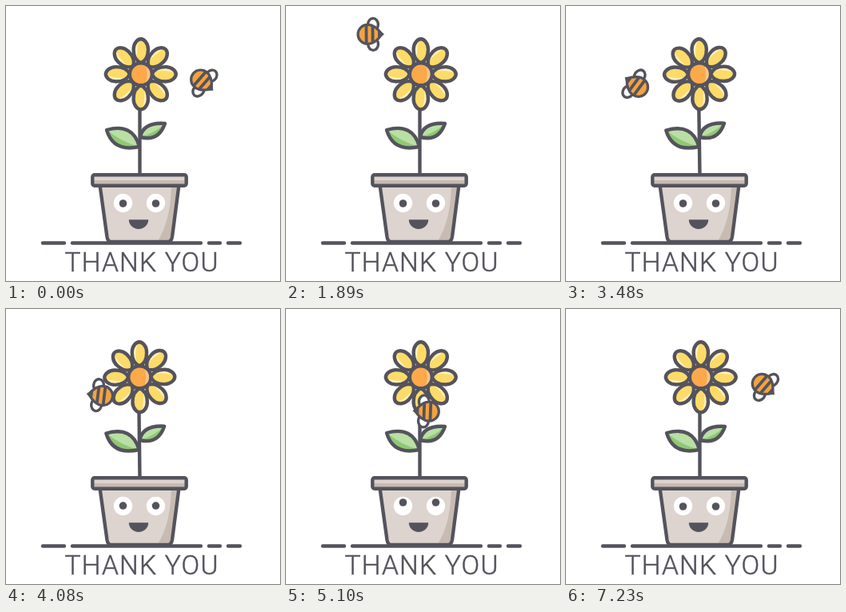
These frames come from a looping animation (343 by 344 pixels, 7.26 s). An HTML page:

```html
<!DOCTYPE html>
<html lang="en">
<head>
<meta charset="utf-8">
<title>Thank you</title>
<style>
  html, body { margin: 0; width: 100%; height: 100%; overflow: hidden; background: #fff; }
  svg { display: block; width: 100vw; height: 100vh; }
  .line { stroke: #54535d; stroke-width: 4.4; stroke-linecap: round; stroke-linejoin: round; fill: none; }
  .dark { fill: #54535d; }
  .light { fill: #b9dfa5; }
  .shade { fill: #8fc874; }
  text { font: 300 33.5px Roboto, sans-serif; letter-spacing: 1.2px; fill: #54535d; stroke: #54535d; stroke-width: .5; text-anchor: middle; }
</style>
</head>
<body>
<svg viewBox="0 0 343 344">
  <defs>
    <path id="petalShape" d="M0-14C-7-17-9.2-25-9.2-31C-9.2-39-4-44 0-44S9.2-39 9.2-31C9.2-25 7-17 0-14Z"/>
    <g id="petal">
      <use href="#petalShape" fill="#fddb68"/>
      <path d="M-2-42Q-12-31-4-18Q-6-30-2-42" fill="#fef0bd"/>
      <use href="#petalShape" class="line"/>
    </g>
    <path id="leftLeaf" d="M126 155Q159 146 167 176Q134 183 126 155Z"/>
    <path id="rightLeaf" d="M168 164Q172 145 199 147Q191 170 168 164Z"/>
    <path id="pot" d="M117.5 224L126.5 289Q127.5 295 132 295H202Q207 295 208 289L216.5 224"/>
    <clipPath id="potShape"><use href="#pot"/></clipPath>
  </defs>

  <g id="plant">
    <path class="line" d="M167.5 128V212"/>
    <use href="#leftLeaf" class="light"/>
    <path class="shade" d="M126 155Q146 171 167 176Q134 183 126 155Z"/>
    <use href="#leftLeaf" class="line"/>
    <use href="#rightLeaf" class="light"/>
    <path class="shade" d="M168 164Q186 159 199 147Q191 170 168 164Z"/>
    <use href="#rightLeaf" class="line"/>
    <g id="flower" transform="translate(168.8 85.3)"></g>
  </g>

  <g clip-path="url(#potShape)">
    <path d="M110 220H225V300H110Z" fill="#ddd3cf"/>
    <path d="M207 220Q207 270 188 297H225V220Z" fill="#c8bbb2"/>
  </g>
  <use href="#pot" class="line"/>
  <path d="M109 211H225V218H109Z" fill="#ddd3cf"/>
  <path d="M109 218H225V225H109Z" fill="#c8bbb2"/>
  <rect class="line" x="108.3" y="211.3" width="117.4" height="13.4" rx="2.5"/>
  <path class="line" d="M46 296.5H73M83 296.5H244M254 296.5H268M278 296.5H293"/>

  <g id="eyes"></g>
  <path class="dark" d="M153.8 267.3H178.2A12.2 11.7 0 0 1 153.8 267.3Z"/>
  <text x="170.1" y="332.3">THANK YOU</text>

  <g id="bee">
    <g class="line" style="fill:#fff;stroke-width:3.4">
      <ellipse cx="-4" cy="-12.2" rx="6.4" ry="7.8"/>
      <ellipse cx="-4" cy="12.2" rx="6.4" ry="7.8"/>
    </g>
    <path class="line" style="fill:#f2a340;stroke-width:3.2" d="M-15 0Q-6-12.5 3-12A12 12 0 0 1 3 12Q-6 12.5-15 0Z"/>
    <path class="line" style="stroke-width:3.8;stroke-linecap:butt" d="M-3.5-11V11M4.5-12V12"/>
    <path class="dark" d="M-18 0L-10-6.5V6.5Z"/>
  </g>
</svg>
<script>
const $ = id => document.getElementById(id);
const LOOP = 7260;

// Points on the bee's closed path, evenly spaced in time
const path = [
  [246, 94], [204, 67], [158, 47], [110, 35.5], [78, 44], [72.5, 80],
  [95, 104], [127, 110], [160, 126], [199, 130], [238.5, 144], [267, 122]
];

// Catmull-Rom position along the path
function fly(t) {
  const n = path.length, s = (t / LOOP + 1) * n, i = Math.floor(s), u = s - i;
  const [p, a, b, q] = [-1, 0, 1, 2].map(d => path[(i + d) % n]);
  return [0, 1].map(k => a[k] + u / 2 * (b[k] - p[k] +
    u * (2 * p[k] - 5 * a[k] + 4 * b[k] - q[k] + u * (3 * (a[k] - b[k]) + q[k] - p[k]))));
}

const clamp = v => Math.min(1, Math.max(0, v));
const smooth = v => (1 - Math.cos(Math.PI * clamp(v))) / 2;
// Rises from 0 to 1 after start and falls back before end
const pulse = (t, start, end, ramp) => smooth(Math.min(t - start, end - t) / ramp);

$('flower').innerHTML = [45, 135, 225, 315, 0, 90, 180, 270]
  .map(a => `<use href="#petal" transform="rotate(${a})"/>`).join('') +
  '<circle r="14" fill="#fca94a"/><path d="M5-13A14 14 0 0 1 5 13Q11 0 5-13" fill="#fbc486"/>' +
  '<circle class="line" r="14"/>';
$('eyes').innerHTML = [146.5, 187.5].map(x =>
  `<g class="eye" data-x="${x}"><circle r="11.7" fill="#fff"/><circle class="pupil dark" r="4.8"/></g>`).join('');
const eyes = document.querySelectorAll('.eye'), pupils = document.querySelectorAll('.pupil');

function draw(now) {
  const t = now % LOOP;
  const [x, y] = fly(t), [nx, ny] = fly(t + 1);
  const heading = Math.atan2(ny - y, nx - x) * 180 / Math.PI;
  const sway = -2.7 * Math.sin(2 * Math.PI * clamp((t - 3200) / 1300) ** 2);
  const look = pulse(t, 850, 1850, 220) + pulse(t, 3980, 5750, 350);
  const blink = pulse(t, 640, 860, 110) + pulse(t, 6300, 6500, 100);

  $('bee').setAttribute('transform', `translate(${x} ${y}) rotate(${heading})`);
  $('plant').setAttribute('transform', `rotate(${sway} 167.5 212)`);
  eyes.forEach(e => e.setAttribute('transform', `translate(${e.dataset.x} 246.5) scale(1 ${1 - 0.9 * blink})`));
  pupils.forEach(p => p.setAttribute('cy', 0.5 - 5 * look));
  requestAnimationFrame(draw);
}
draw(performance.now());
</script>
</body>
</html>
```
